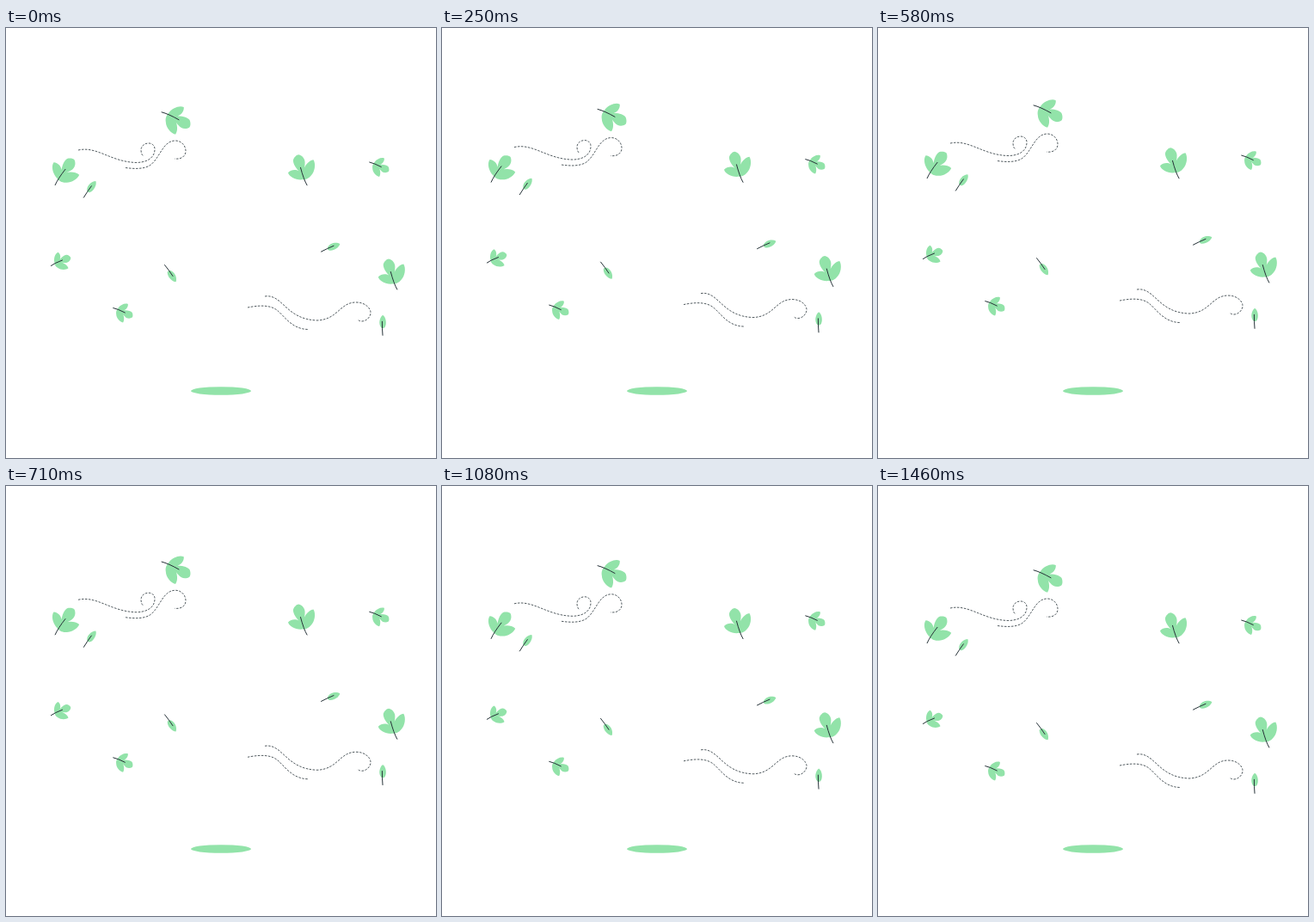
These frames come from a looping animation (500 px wide and 500 px high, 1500 ms). An HTML page:

```html
<!DOCTYPE html>
<html lang="en">
<head>
<meta charset="utf-8">
<title>Floating leaves</title>
<style>
  html, body { margin: 0; height: 100%; overflow: hidden; background: #fff; }
  svg { display: block; width: 100%; height: 100%; }
  .blade { fill: #92e3a9; }
  .stem { fill: none; stroke: #263238; stroke-linecap: round; vector-effect: non-scaling-stroke; }
  #wind { fill: none; stroke: #263238; stroke-width: .8; stroke-dasharray: 2.5 1.5; }
</style>
</head>
<body>
<svg viewBox="0 0 500 500">
  <defs>
    <!-- Both leaves are drawn around the inner end of their stem -->
    <g id="triple">
      <path class="blade" d="M2.5 14C-5 15-13 11-14.5 6C-11 2-5.500 2-2 4C-7-1-9-6-8.500-9C-7.500-12-4.500-15-2.200-15C2-14 6-10 5-4C5-1 4 1 3 3C5-2 9-8 15-9C18-4 16.500 5 12.500 9C9.500 13 6 14 2.500 14Z"/>
      <path class="stem" d="M0 0Q3.500 13.500 7.500 20.500"/>
    </g>
    <g id="single">
      <path class="blade" d="M.8-7.600C4.500-5 5.800 3 2.800 7C1.500 8.300 0 8.300-1.200 7C-4.500 3-3.400-4.500 .8-7.600Z"/>
      <path class="stem" d="M0 0Q-.1 8 .6 16"/>
    </g>
  </defs>
  <ellipse class="blade" cx="250" cy="422" rx="35" ry="4.800"/>
  <g id="floating">
    <g id="wind">
      <path d="M84 142C106 137 122 156 152 156.500C168 156 173 148 173 141C173 136 169 134 166 134C160 134 157 138 157 142C157 145 158 148 160 149"/>
      <path d="M139 162.500C150 164 160 164 167 160C179 152 182 131 197 131C204 131 209 137 209 143C209 149 204 153 196 152"/>
      <path d="M301 312C322 309 325 339 362 340C386 339 388 319 407 319C418 319 424 326 424 331C424 336 419 341 414 341C411 341 410 340 409 339"/>
      <path d="M281 325C291 323 306 321 315 328C324 335 332 350 351 350.500"/>
    </g>
  </g>
</svg>
<script>
const LOOP = 1500, TURN = 730, LIFT = 10;
const floating = document.getElementById('floating');

function addLeaf(kind, x, y, angle = 0, scale = 1) {
  const leaf = document.createElementNS('http://www.w3.org/2000/svg', 'use');
  leaf.setAttribute('href', '#' + kind);
  leaf.setAttribute('transform', `translate(${x} ${y}) rotate(${angle}) scale(${scale})`);
  floating.append(leaf);
}

addLeaf('triple', 342.5, 162.3);
addLeaf('triple', 447.3, 283.5);
addLeaf('triple', 69, 164.3, 53);
addLeaf('triple', 201, 106.7, 134);
addLeaf('triple', 436.3, 161.5, 132, .67);
addLeaf('triple', 138.3, 331, 132, .67);
addLeaf('triple', 65.5, 270, 84, .67);
addLeaf('single', 437.4, 341.3);
addLeaf('single', 99.3, 183.8, 36);
addLeaf('single', 194, 288.5, 146);
addLeaf('single', 381, 253.3, 67);

// Rises and sinks at constant speed, then rests until the loop restarts
function draw() {
  const time = performance.now() % LOOP;
  const rise = LIFT * Math.max(0, 1 - Math.abs(time / TURN - 1));
  floating.setAttribute('transform', `translate(0 ${-rise})`);
  requestAnimationFrame(draw);
}
draw();
</script>
</body>
</html>
```
